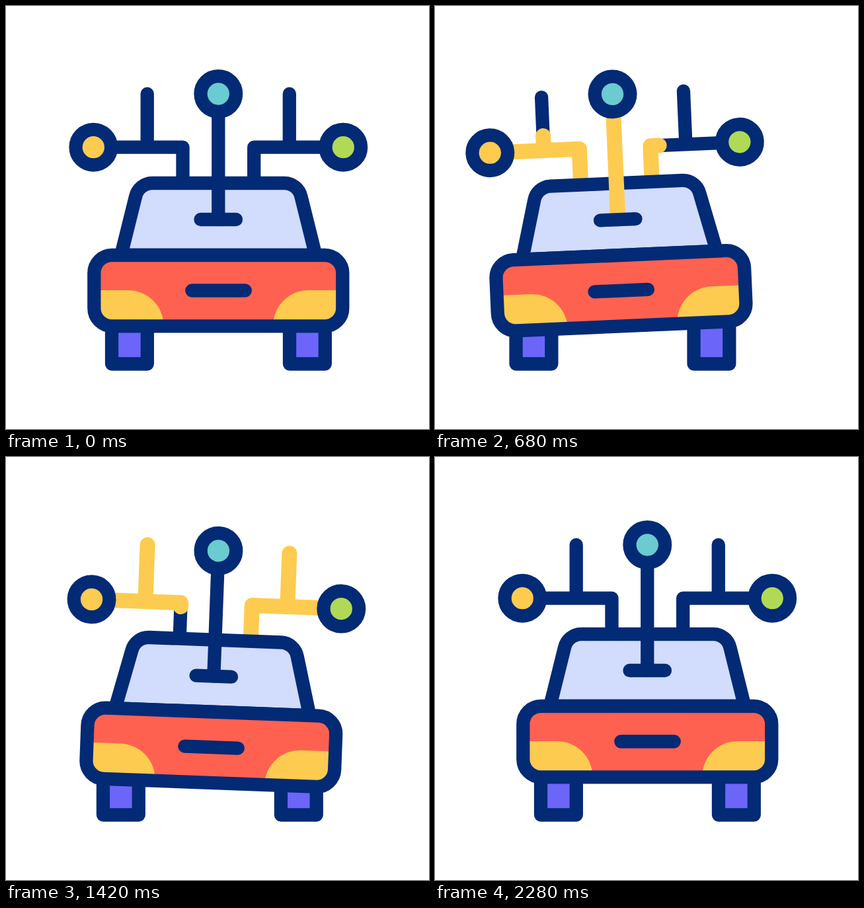
An HTML page that plays this animation: 640x640 px, repeating every 2400 ms.

```html
<!DOCTYPE html>
<html lang="en">
<head>
<meta charset="utf-8">
<title>Connected car</title>
<style>
  html, body { margin: 0; width: 100%; height: 100%; overflow: hidden; background: #fff; }
  svg { display: block; width: 100%; height: 100%; }
  .line { fill: none; stroke: #032a75; stroke-width: 20.3; stroke-linecap: round; stroke-linejoin: round; }
  .pulse { fill: none; stroke: #fdcb50; stroke-width: 23; stroke-linecap: round; stroke-linejoin: round; }
</style>
</head>
<body>
<svg viewBox="0 0 640 640">
  <g id="wheels" class="line">
    <path style="fill:#6b66f9" d="M160 450H213.8V541.5H160Z M429 450H482.8V541.5H429Z"/>
  </g>
  <g id="car">
    <path class="line" d="M267.5 268V213.7H132.3 M213.7 213.7V133 M375.2 268V213.7H510.3 M428.8 213.7V133"/>
    <path class="pulse" data-start="382" pathLength="1" d="M267.5 268V213.7H132.3"/>
    <path class="pulse" data-start="560" pathLength="1" d="M375.2 268V213.7H510.3"/>
    <path class="pulse" data-start="581" pathLength="1" d="M213.7 213.7V128"/>
    <path class="pulse" data-start="758" pathLength="1" d="M428.8 213.7V133"/>

    <path class="line" style="fill:#d2dcfd" d="M174 377L196 288.5A26 26 0 0 1 221 268H421.5A26 26 0 0 1 446.5 288.5L468.5 377Z"/>
    <rect x="133.3" y="377" width="376" height="107.3" rx="27" fill="#ff6150"/>
    <path id="lamp" fill="#fdcb50" d="M133.3 430H184.5A54 54 0 0 1 238.5 484H160Q133.3 484 133.3 457Z"/>
    <use href="#lamp" transform="matrix(-1 0 0 1 642.6 0)"/>
    <rect class="line" x="133.3" y="377" width="376" height="107.3" rx="27"/>

    <path class="line" d="M281.3 430.5H361.8 M321.3 133V323"/>
    <path class="pulse" data-start="160" pathLength="1" d="M321.3 321V133"/>
    <path class="line" d="M294.5 323H348"/>
    <g class="line">
      <circle cx="132.3" cy="213.7" r="26.8" style="fill:#fdcb50"/>
      <circle cx="321.3" cy="133" r="26.8" style="fill:#6acbd0"/>
      <circle cx="510.3" cy="213.7" r="26.8" style="fill:#b0d955"/>
    </g>
  </g>
</svg>
<script>
  const LOOP = 2400, TRIM = 300, ERASE_DELAY = 940;
  const wheels = document.getElementById('wheels');
  const car = document.getElementById('car');
  const pulses = document.querySelectorAll('.pulse');

  // Keyframes as [time, value]
  const drift = [[0, 0], [575, -45.5], [1107, 32.5], [1620, -36], [2280, 0]];
  const bounce = [[0, 0], [380, 12], [1000, -13], [1380, 9], [1840, -9], [2280, 0]];
  const tilt = [[0, 0], [610, -2.56], [1565, 2.45], [2280, 0]];

  function ease(t, from, to) {
    const s = Math.min(1, Math.max(0, (t - from) / (to - from)));
    return s * s * (3 - 2 * s);
  }

  // Each eased segment adds its own change in value
  function valueAt(keys, t) {
    return keys.slice(1).reduce((sum, [time, value], i) =>
      sum + (value - keys[i][1]) * ease(t, keys[i][0], time), keys[0][1]);
  }

  function render(t) {
    const x = valueAt(drift, t);
    wheels.setAttribute('transform', `translate(${x} 0)`);
    car.setAttribute('transform',
      `translate(${x} ${valueAt(bounce, t)}) rotate(${valueAt(tilt, t)} 321.3 486)`);

    for (const pulse of pulses) {
      const start = +pulse.dataset.start;
      // The right-hand wire clears fully before its branch begins to fade
      const head = ease(t, start, start + TRIM);
      const tail = ease(t, start + ERASE_DELAY, start + ERASE_DELAY + TRIM);
      const length = head - tail;
      pulse.style.display = length > 0.002 ? '' : 'none';
      pulse.style.strokeDasharray = `${length} 9`;
      pulse.style.strokeDashoffset = -tail;
    }
  }

  function tick() {
    render(performance.now() % LOOP);
    requestAnimationFrame(tick);
  }
  tick();
</script>
</body>
</html>
```
